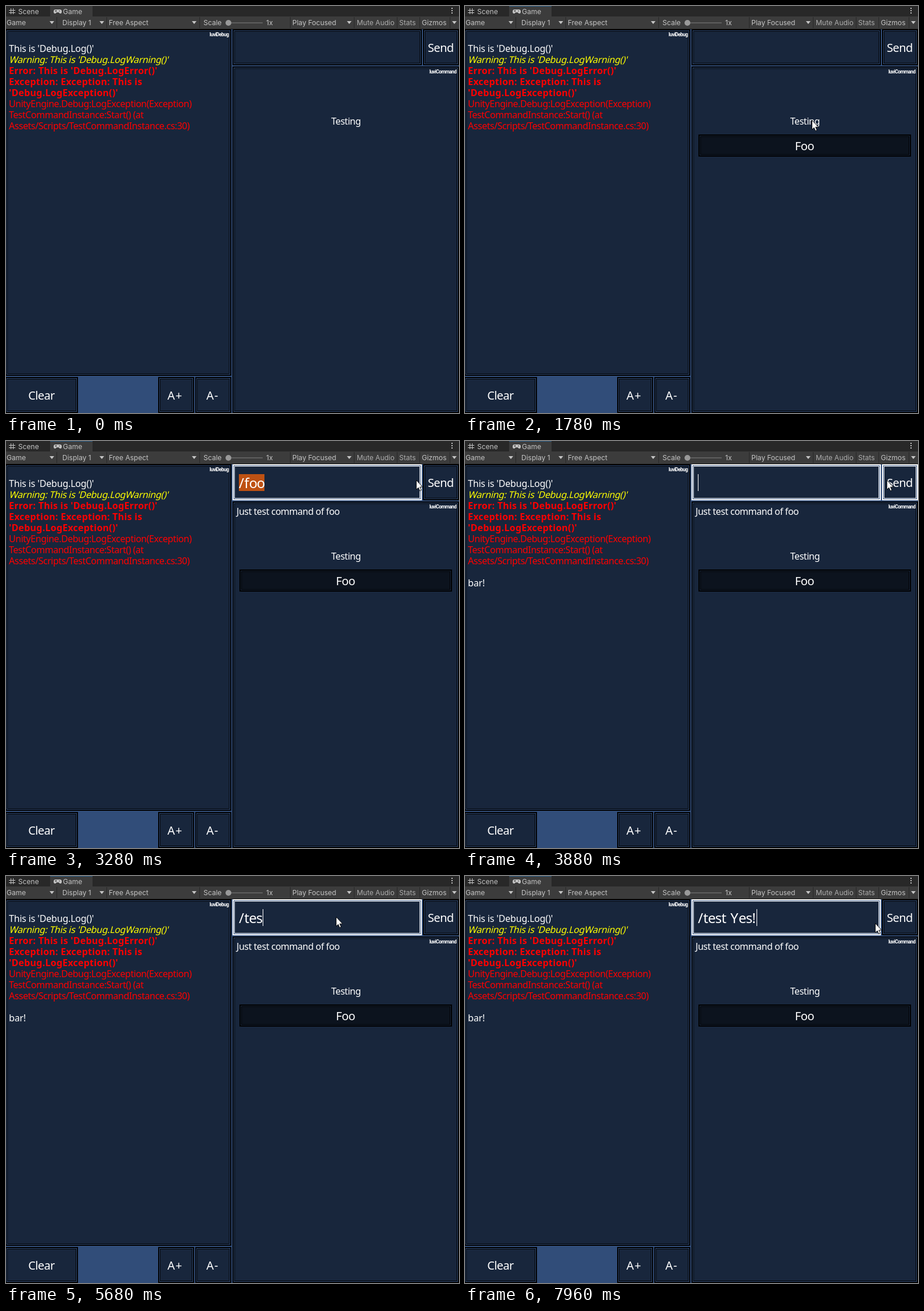
These frames come from a looping animation (780x700 px, 8 s). An HTML page:

```html
<!DOCTYPE html>
<html lang="en">
<head>
<meta charset="utf-8">
<title>Debug console and command panel</title>
<style>
html, body { margin: 0; width: 100%; height: 100%; overflow: hidden; background: #314d79; }
svg { display: block; width: 780px; height: 700px; }
text { font-family: "Noto Sans", "Open Sans", sans-serif; font-size: 16px; fill: #fff; white-space: pre; }
.log { letter-spacing: -.18px; }
.warn { fill: #ff0; letter-spacing: -.33px; }
.error { fill: #f00; font-weight: 700; letter-spacing: .23px; }
.trace { fill: #f00; letter-spacing: -.47px; }
.note { letter-spacing: -.46px; }
.button { font-size: 20px; letter-spacing: -.6px; text-anchor: middle; }
.zoom { letter-spacing: .8px; }
.input { font-size: 24px; }
.menu { font: 12px Inter, Roboto, sans-serif; fill: #c4c4c4; }
.dim { fill: #acacac; }
.brand { font: 700 8.6px Roboto, sans-serif; letter-spacing: -.62px; text-anchor: end; }
</style>
</head>
<body>
<svg id="stage" viewBox="0 0 780 700" xmlns="http://www.w3.org/2000/svg"></svg>
<script>
const LOOP = 8000, STEP = 60, PHASE = 40;
const stage = document.getElementById("stage");
const $ = id => document.getElementById(id);

const rect = (x, y, w, h, fill, more = "") =>
  `<rect x="${x}" y="${y}" width="${w}" height="${h}" fill="${fill}" ${more}/>`;
const text = (x, y, cls, str, more = "") =>
  `<text x="${x}" y="${y}" class="${cls}" ${more}>${str}</text>`;
const arrow = x => `<path d="M${x - 4} 26h8l-4 5z" fill="#c4c4c4"/>`;

// Double-framed translucent box: 2px line, 1px gap, 1px line
function box(id, x, y, w, h) {
  return rect(x + 3, y + 3, w - 6, h - 6, "#000", 'fill-opacity=".5"') +
    `<g id="${id}" fill="none" stroke="#000">` +
    rect(x + 1, y + 1, w - 2, h - 2, "none", 'stroke-width="2"') +
    rect(x + 3.5, y + 3.5, w - 7, h - 7, "none") + "</g>";
}

function toolbar() {
  const labels = [[1, "Game"], [97, "Display 1"], [177, "Free Aspect"], [340, "Scale"],
    [448, "1x"], [493, "Play Focused"], [716, "Gizmos"]];
  return rect(0, 0, 780, 40, "#282828") + rect(76, 0, 73, 19, "#3c3c3c") +
    rect(0, 18, 780, 21, "#3c3c3c") + rect(0, 39, 780, 1, "#212121") +
    rect(76, 0, 73, 1, "#2c5d87", 'id="focus"') +
    '<path d="M8.5 4v10M12.5 4v10M5 7.5h11M5 11.5h11" stroke="#c4c4c4" fill="none"/>' +
    '<path d="M85 6h8q3 0 3 3.500t-2.500 3.500q-1.500 0-2.500-2h-4q-1 2-2.500 2q-2.500 0-2.500-3.500t3-3.500z" fill="#c4c4c4"/>' +
    '<path d="M84.500 8.500h3M86 7v3M91 8.500h2" stroke="#3c3c3c"/>' +
    text(21, 14, "menu", "Scene") + text(98, 14, "menu", "Game") +
    [4, 8, 12].map(y => rect(767, y - 1, 2, 2, "#c4c4c4")).join("") +
    [87, 173, 333, 489, 599, 673, 712, 764].map(x => rect(x, 19, 1, 19, "#282828")).join("") +
    labels.map(([x, s]) => text(x, 33, "menu", s)).join("") +
    text(604, 33, "menu dim", "Mute Audio") + text(677, 33, "menu dim", "Stats") +
    [79, 165, 324, 591, 772].map(arrow).join("") +
    rect(378, 28, 64, 2, "#5e5e5e") + '<circle cx="383" cy="29" r="5" fill="#999"/>';
}

function logLines() {
  const lines = [
    ["log", "This is 'Debug.Log()'"],
    ["warn", "Warning: This is 'Debug.LogWarning()'"],
    ["error", "Error: This is 'Debug.LogError()'"],
    ["error", "Exception: Exception: This is"],
    ["error", "'Debug.LogException()'"],
    ["trace", "UnityEngine.Debug:LogException(Exception)"],
    ["trace", "TestCommandInstance:Start() (at"],
    ["trace", "Assets/Scripts/TestCommandInstance.cs:30)"]
  ];
  return lines.map(([cls, s], i) => {
    const skew = cls === "warn" ? " skewX(-14)" : "";
    return text(0, 0, cls, s, `transform="translate(5 ${79 + 19 * i})${skew}"`);
  }).join("") + text(5, 250, "log", "bar!", 'id="reply"');
}

stage.innerHTML = rect(0, 0, 780, 700, "#314d79") + toolbar() +
  box("logFrame", -1, 40, 389, 596) + text(383.5, 52, "brand", "luviDebug") + logLines() +
  box("clearFrame", -1, 638, 125, 62) + text(61, 677, "button", "Clear") +
  box("plusFrame", 262, 638, 62, 62) + text(291, 677, "button zoom", "A+") +
  box("minusFrame", 326, 638, 62, 62) + text(355.5, 677, "button zoom", "A-") +
  box("inputFrame", 390, 40, 326, 62) +
  rect(401, 57, 44, 29, "#be5113", 'id="selection"') +
  text(401, 81, "input", "", 'id="typed"') + rect(401, 57, 1, 29, "#fff", 'id="caret"') +
  box("sendFrame", 718, 40, 62, 62) + text(748.5, 79, "button", "Send") +
  box("commandFrame", 390, 104, 390, 596) + text(775.5, 116, "brand", "luviCommand") +
  text(397, 127, "note", "Just test command of foo", 'id="help"') +
  text(560, 204, "note", "Testing") +
  `<g id="foo">${box("fooFrame", 402, 221, 366, 38)}${text(584.5, 248, "button", "Foo")}</g>` +
  '<path id="pointer" d="M.5 .5V16.500L4 13.200L6.500 18.700L9 17.600L6.600 12.200H11.500Z" fill="#fff" stroke="#000" stroke-width=".9"/>';

// time, x, y and, for a curved approach, the control point
const path = [
  [1000, 705, 672], [1660, 597, 196, 563, 440], [1900, 597, 196], [2200, 584, 245], [2500, 584, 245],
  [2920, 690, 92], [3040, 690, 92], [3280, 706, 67], [3340, 706, 67], [3700, 726, 67],
  [3880, 726, 67], [4180, 555, 71], [4360, 568, 70], [7720, 568, 70], [7780, 578, 65], [7960, 706, 81]
];
const keyTimes = [5200, 5440, 5500, 5680, 5800, 5980, 6580, 6820, 7000, 7180];
const message = "/test Yes!";
const advance = { "/": .382, t: .334, e: .527, s: .447, " ": .313, Y: .576, "!": .332, f: .352, o: .543 };

const FOCUS = 1720, POPUP = 1780, PRESS = 2380, PICK = 2440, SEND = 3820;

function pointerAt(t) {
  const i = path.findIndex(k => k[0] > t);
  if (i < 0) return path[path.length - 1].slice(1, 3);
  if (i === 0) return null;
  const [t0, x0, y0] = path[i - 1];
  const [t1, x1, y1, cx = (x0 + x1) / 2, cy = (y0 + y1) / 2] = path[i];
  const u = (t - t0) / (t1 - t0), e = u * u * (3 - 2 * u);
  const bend = (a, c, b) => Math.round((1 - e) ** 2 * a + 2 * e * (1 - e) * c + e * e * b);
  return [bend(x0, cx, x1), bend(y0, cy, y1)];
}

const show = (id, on) => $(id).setAttribute("visibility", on ? "visible" : "hidden");
const frame = (id, color) => $(id).setAttribute("stroke", color);
const inside = (p, x, y, w, h) => p && p[0] >= x && p[0] < x + w && p[1] >= y && p[1] < y + h;

function typedAt(t) {
  if (t < PICK) return "";
  if (t < SEND) return "/foo";
  return message.slice(0, keyTimes.filter(k => k <= t).length);
}

function draw(time) {
  const t = Math.max(0, Math.floor((time - PHASE) / STEP) * STEP + PHASE);
  const p = pointerAt(t);
  show("pointer", p);
  if (p) $("pointer").setAttribute("transform", `translate(${p[0]} ${p[1]})`);

  show("focus", t >= FOCUS);
  show("foo", t >= POPUP);
  show("help", t >= PICK);
  show("selection", t >= PICK && t < SEND);
  show("reply", t >= SEND);
  show("caret", t >= SEND);

  const pressed = t >= PRESS && t < PICK;
  frame("fooFrame", inside(p, 402, 221, 366, 38) ? (pressed ? "#c8c8c8" : "#fff") : "#000");
  frame("sendFrame", inside(p, 718, 40, 62, 62) ? "#fff" : "#000");
  frame("inputFrame", t >= PICK ? "#fff" : "#000");

  let x = 401;
  const str = typedAt(t), xs = [];
  for (const c of str) { xs.push(x); x += advance[c] * 24; }
  $("typed").textContent = str;
  $("typed").setAttribute("x", xs.join(" "));
  $("caret").setAttribute("x", Math.round(x));
}

const start = performance.now();
function tick() {
  draw((performance.now() - start) % LOOP);
  requestAnimationFrame(tick);
}
tick();
</script>
</body>
</html>
```
